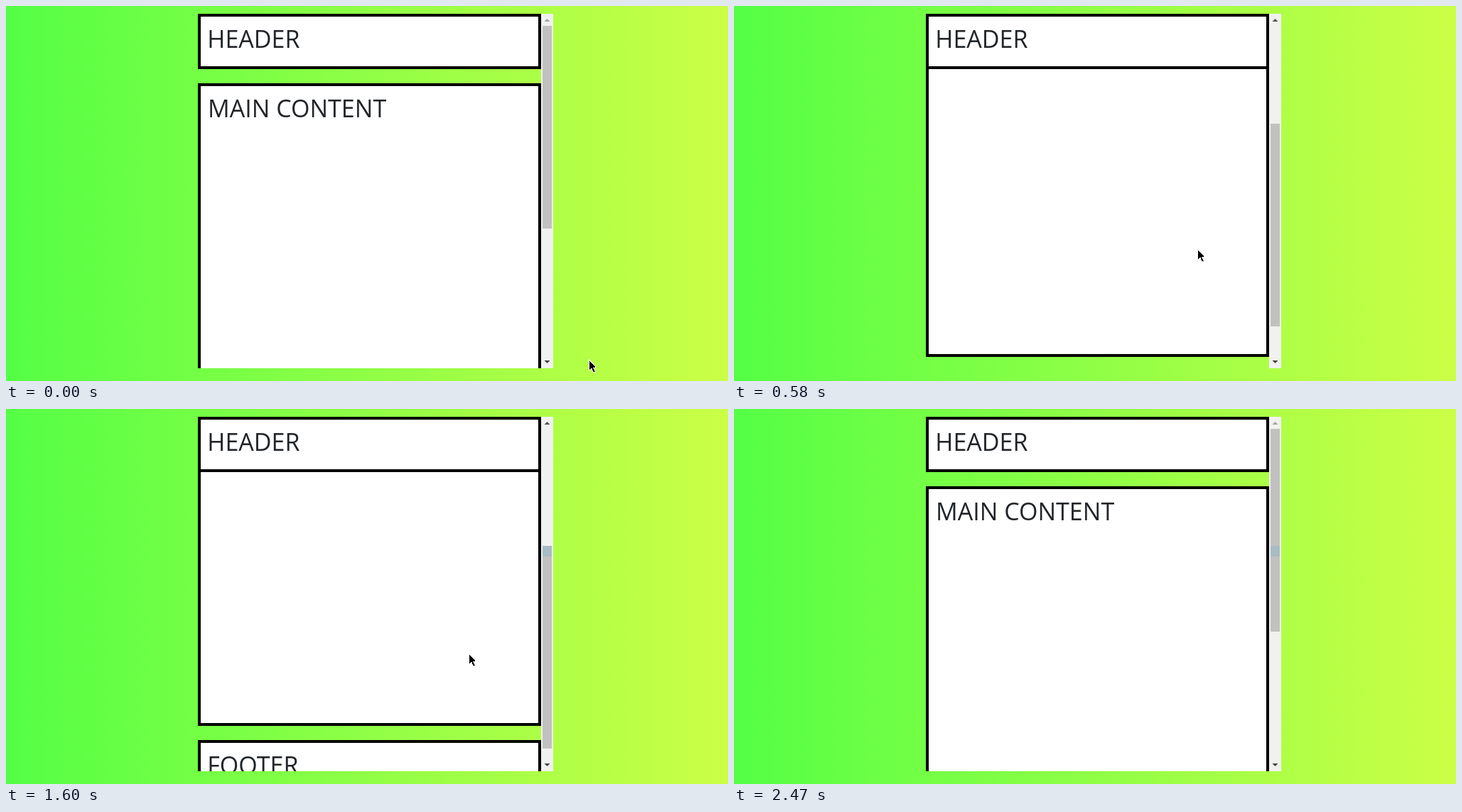
An HTML page for the animation above (3170 ms loop, 1016 by 529 pixels).

```html
<!DOCTYPE html>
<html lang="en">
<head>
<meta charset="utf-8">
<title>Sticky header</title>
<style>
  html, body { margin: 0; width: 100%; height: 100%; overflow: hidden; }
  svg { display: block; width: 100%; height: 100%; }
  text { font: 34px "Open Sans", "Noto Sans", sans-serif; fill: #212529; }
  .box { fill: #fff; stroke: #000; stroke-width: 4; }
</style>
</head>
<body>
<svg viewBox="0 0 1016 529" preserveAspectRatio="none">
  <defs>
    <linearGradient id="bg">
      <stop offset="0" stop-color="#54ff45"/>
      <stop offset="1" stop-color="#cbff46"/>
    </linearGradient>
    <clipPath id="view"><rect x="270" y="11" width="483" height="500"/></clipPath>
  </defs>
  <rect width="1016" height="529" fill="url(#bg)"/>

  <g clip-path="url(#view)">
    <g id="page">
      <rect class="box" x="272" y="111" width="479" height="623"/>
      <text x="284" y="157">MAIN CONTENT</text>
      <rect class="box" x="272" y="758" width="479" height="66"/>
      <text x="283.3" y="804">FOOTER</text>
    </g>
    <rect class="box" x="272" y="13" width="479" height="74"/>
    <text x="283.3" y="59">HEADER</text>
  </g>

  <rect x="753" y="11" width="17" height="500" fill="#f1f1f1"/>
  <path id="up" d="M757.5 22L761.5 18L765.5 22Z"/>
  <path id="down" d="M757.5 500L761.5 504L765.5 500Z"/>
  <rect id="thumb" x="755" y="28" width="13" height="286" fill="#c1c1c1"/>
  <rect id="patch" x="755" y="193" width="13" height="15" fill="#a9bbc4"/>

  <path id="cursor" d="M0 0V13L3 10L5.5 16H8L5.2 10H8V8.6Z"
        stroke="#fff" stroke-width="2" paint-order="stroke" shape-rendering="crispEdges"/>
</svg>
<script>
  const LOOP = 3170, MAX_SCROLL = 315, MAX_THUMB = 180, SCROLL_UP = 1600;
  const [page, thumb, cursor, up, down, patch] =
    ["page", "thumb", "cursor", "up", "down", "patch"].map(id => document.getElementById(id));

  const easeInOut = (p, power) =>
    p < 0.5 ? (2 * p) ** power / 2 : 1 - (2 - 2 * p) ** power / 2;

  // Progress 0..1 in a few hard steps, the first shown at `start`, the last at `end`
  function glide(t, start, end, steps, power) {
    if (t < start) return 0;
    const shown = 1 + Math.floor((t - start + 4) / (end - start) * (steps - 1));
    return easeInOut(Math.min(1, shown / steps), power);
  }

  const move = (node, x, y) => node.setAttribute("transform", `translate(${x} ${y})`);

  function draw(t) {
    const scrolled = glide(t, 500, 660, 3, 1.86) - glide(t, SCROLL_UP, 1830, 4, 2.6);
    move(page, 0, -Math.round(scrolled * MAX_SCROLL));
    move(thumb, 0, Math.round(scrolled * MAX_THUMB));
    up.setAttribute("fill", scrolled > 0 ? "#505050" : "#a3a3a3");
    down.setAttribute("fill", scrolled < 1 ? "#404040" : "#a9bbc4");
    patch.setAttribute("visibility", t >= SCROLL_UP ? "visible" : "hidden");

    // Into the page, a small nudge, then out past the lower edge
    const enter = glide(t, 70, 360, 5, 2.2);
    const nudge = t >= 980 ? 1 : 0;
    const leave = glide(t, 2240, 2470, 4, 1.5);
    move(cursor,
      Math.round(821 - 168 * enter - nudge + 249 * leave),
      Math.round(500 - 156 * enter + 2 * nudge + 199 * leave));
  }

  const start = performance.now();
  function tick() {
    draw((performance.now() - start) % LOOP);
    requestAnimationFrame(tick);
  }
  tick();
</script>
</body>
</html>
```
